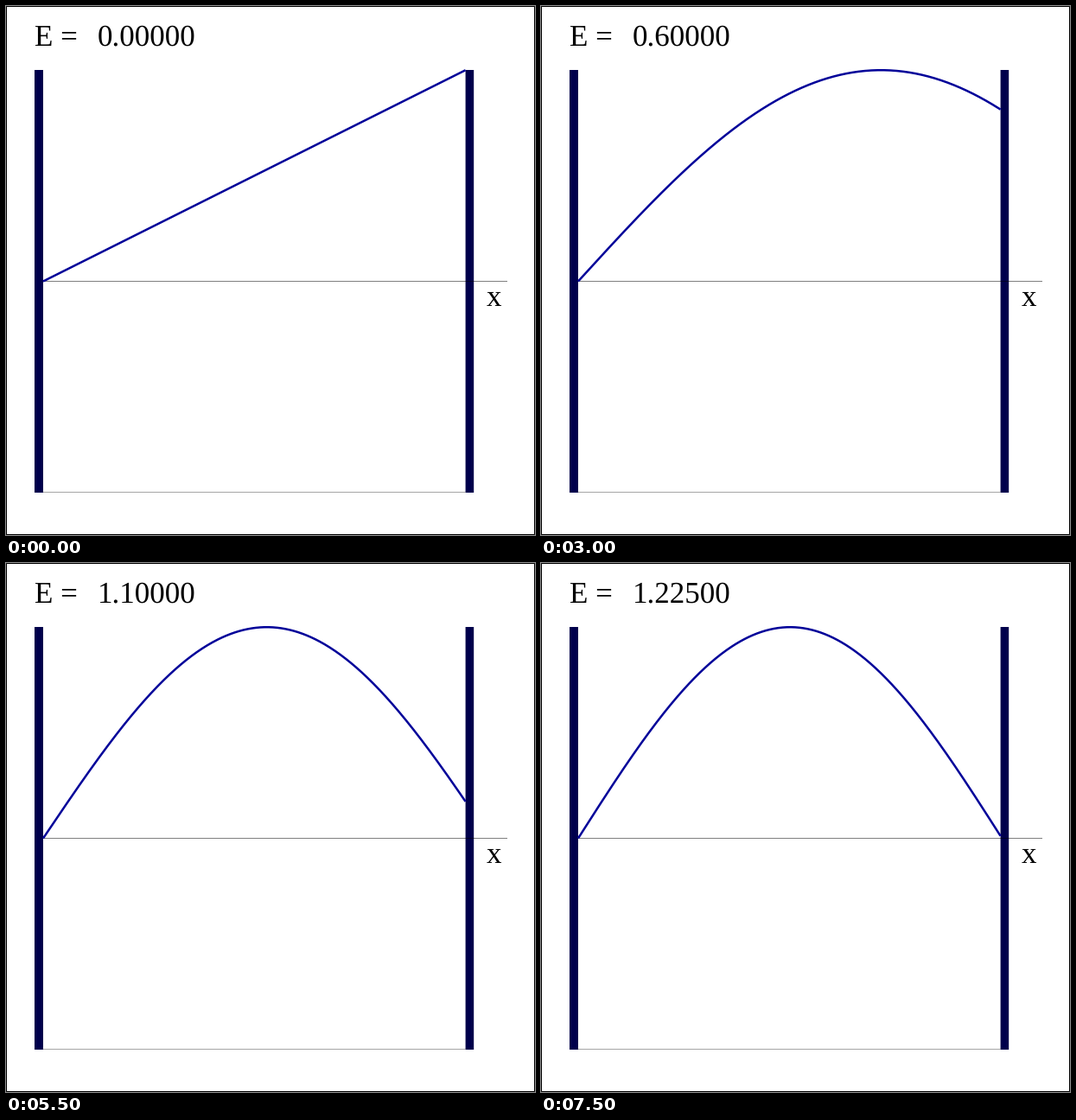
Write a matplotlib script that moves like this. It is 612 px wide and 612 px high and loops after 8 s.

```python
import matplotlib.pyplot as plt
import numpy as np
from matplotlib.animation import FuncAnimation
from matplotlib.patches import Rectangle

SIZE, DPI = 612, 72
LEFT, RIGHT = 43, 531.6      # inner faces of the walls
MID, AMP = 318.5, 244.3      # axis height and peak amplitude
WIDTH = 2.0                  # width of the well in model units

plt.rcParams["text.hinting"] = "none"

# Shooting method: step up until the end value changes sign, then bisect.
energies = [0.1 * i for i in range(14)] + [1.25, 1.225]

fig = plt.figure(figsize=(SIZE / DPI, SIZE / DPI), dpi=DPI, facecolor="white")
ax = fig.add_axes([0, 0, 1, 1])
ax.set(xlim=(0, SIZE), ylim=(SIZE, 0))
ax.axis("off")


def box(x, y, w, h, **style):
    ax.add_patch(Rectangle((x, y), w, h, snap=False, **style))


def hline(x0, x1, y, alpha):
    box(x0, y - 0.5, x1 - x0, 1, fc="black", lw=0, alpha=alpha, zorder=3)


def label(x, y, text):
    return ax.text(x, y, text, family="Liberation Serif", size=35,
                   color="black", va="baseline", ha="left")


def wave(energy):
    """Solution of psi'' = -2 E psi with psi(0) = 0, scaled to peak at 1."""
    x = np.linspace(0, WIDTH, 400)
    k = np.sqrt(2 * energy)
    psi = np.sin(k * x) if k > 0 else x
    return x, psi / psi.max()


box(0.5, 0.5, SIZE - 1, SIZE - 1, fc="none", ec="black", lw=1)
for x, w in ((33, 10), (RIGHT, 9.6)):
    box(x, 74, w, 489, fc="#00004c", lw=0)
hline(LEFT, 580, MID, 0.5)
hline(LEFT, RIGHT, 562.5, 0.35)

label(32.6, 46, "E =")
value = label(106.1, 46, "")
label(555.6, 347, "x")
curve, = ax.plot([], [], color="#000099", lw=2.5, zorder=4,
                 solid_capstyle="butt")


def update(i):
    x, psi = wave(energies[i])
    curve.set_data(LEFT + x / WIDTH * (RIGHT - LEFT), MID - AMP * psi)
    value.set_text(f"{energies[i]:.5f}")
    return curve, value


anim = FuncAnimation(fig, update, frames=len(energies), interval=500,
                     repeat=True, repeat_delay=0)
plt.show()
```
